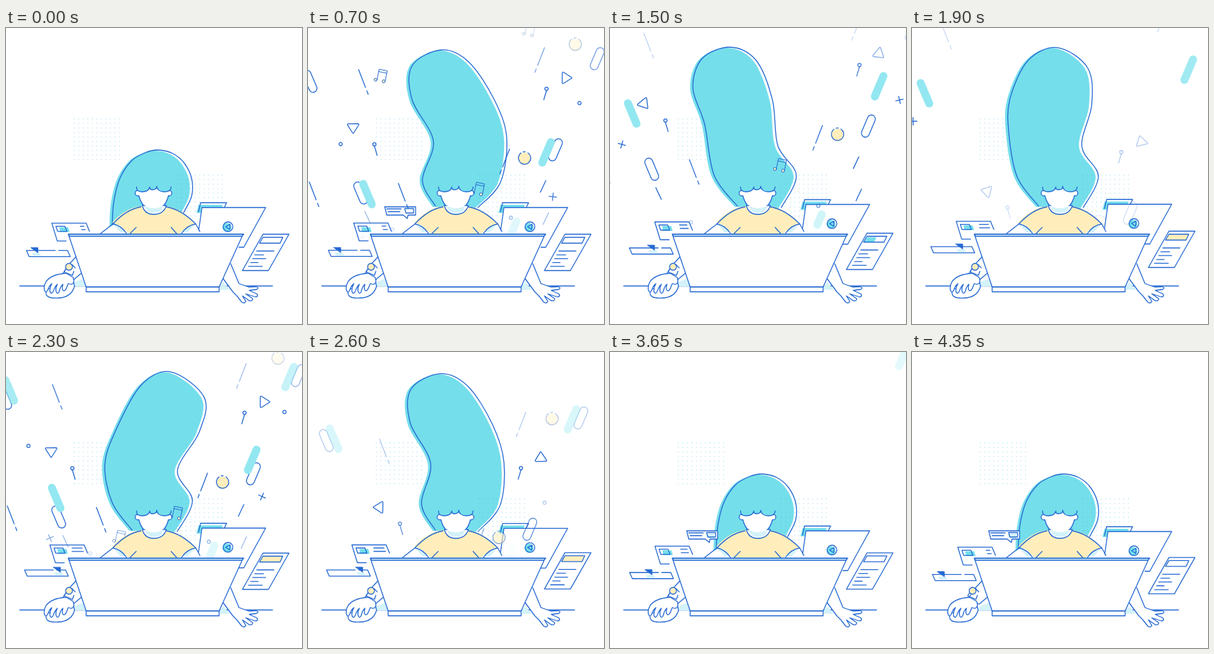
An HTML page with a canvas for the animation above (4400 ms loop, 432 px wide and 432 px high).

```html
<!DOCTYPE html>
<html lang="en">
<head>
<meta charset="utf-8">
<title>Hair-raising desk</title>
<style>
html, body { margin: 0; width: 100%; height: 100%; overflow: hidden; background: #fff; }
canvas { display: block; width: 432px; height: 432px; }
</style>
</head>
<body>
<canvas id="stage"></canvas>
<script>
const LOOP = 4400, BLUE = '#2468d2', CYAN = '#74deeb', PALE = '#d3f2f9', YELLOW = '#ffeebb';
const canvas = document.getElementById('stage'), c = canvas.getContext('2d');
const ratio = window.devicePixelRatio || 1;
canvas.width = canvas.height = 432 * ratio;

const clamp = v => Math.max(0, Math.min(1, v));
const frac = v => v - Math.floor(v);
const ease = v => (1 - Math.cos(Math.PI * clamp(v))) / 2;

// Eased value through [time, value] pairs.
function key(t, ...pairs) {
  let i = 0;
  while (i < pairs.length - 1 && t > pairs[i + 1][0]) i++;
  const [t0, a] = pairs[i], [t1, b] = pairs[i + 1] || [t0 + 1, a];
  return a + (b - a) * ease((t - t0) / (t1 - t0));
}

function draw(d, fill, line = BLUE, width = 1.3) {
  const p = d instanceof Path2D ? d : new Path2D(d);
  if (fill) { c.fillStyle = fill; c.fill(p); }
  if (line) { c.strokeStyle = line; c.lineWidth = width; c.stroke(p); }
}

function disc(x, y, r, fill, line = BLUE, width) {
  const p = new Path2D();
  p.arc(x, y, r, 0, 7);
  draw(p, fill, line, width);
}

function at(x, y, paint) {
  c.save();
  c.translate(x, y);
  paint();
  c.restore();
}

function dots(x, y) {
  c.fillStyle = 'rgba(70,190,220,.35)';
  for (let i = 0; i < 11; i++)
    for (let j = 0; j < 10; j++) c.fillRect(x + i * 6.6, y + j * 6.6, 1.4, 1.4);
}

// Hair: outline points from the left temple over the top to the right one.
const REST = [[155,292],[157,256],[166,220],[183,194],[203,182],[222,178],[243,183],[260,197],[271,220],[271,245],[259,270]];
const BENT_LEFT = [[186,260],[167,222],[183,165],[152,105],[152,55],[195,32],[235,50],[272,105],[290,160],[281,225],[248,262]];
const BENT_RIGHT = [[184,260],[155,220],[144,165],[160,115],[197,49],[241,29],[290,67],[282,117],[250,173],[272,217],[250,262]];
const LEANING = [[186,260],[152,215],[138,140],[121,88],[134,45],[175,28],[213,47],[237,105],[245,172],[272,215],[250,262]];
const SWAY = [BENT_LEFT, BENT_RIGHT, LEANING];

function hairPoints(t) {
  const up = key(t, [100, 0], [560, 1], [3300, 1], [3600, 0]);
  const s = frac((t - 700) / 483) * 3, n = Math.floor(s), mix = ease(s - n);
  const from = SWAY[n], to = SWAY[(n + 1) % 3];
  return REST.map((p, i) => p.map((v, k) => {
    const wave = from[i][k] + (to[i][k] - from[i][k]) * mix;
    return v + (wave - v) * up;
  }));
}

function smooth(pts) {
  const p = new Path2D(), get = i => pts[Math.max(0, Math.min(pts.length - 1, i))];
  p.moveTo(...pts[0]);
  for (let i = 0; i < pts.length - 1; i++) {
    const [a, b, d, e] = [get(i - 1), get(i), get(i + 1), get(i + 2)];
    p.bezierCurveTo(b[0] + (d[0] - a[0]) / 6, b[1] + (d[1] - a[1]) / 6,
      d[0] - (e[0] - b[0]) / 6, d[1] - (e[1] - b[1]) / 6, ...d);
  }
  return p;
}

function hair(t) {
  const p = smooth(hairPoints(t));
  at(-4, 1, () => draw(p, CYAN, null));
  draw(p);
}

// Flying shapes, drawn for the right side and mirrored for the left.
function capsule(length, fill, line) {
  c.rotate(.4);
  const p = new Path2D();
  p.roundRect(-5.8, -length / 2, 11.6, length, 5.8);
  draw(p, fill, line);
}

const shapes = {
  ring: () => disc(0, 0, 2.4),
  outline: () => capsule(34, null, BLUE),
  cyan: () => capsule(44, '#93e7f1', null),
  pale: () => capsule(28, '#93e7f1', null),
  dash: () => draw('M5 -13 L-5 13 M-7 18 L-9 23'),
  tick: () => draw('M4 -9 L-4 8'),
  pin: () => { disc(1, -7, 2.4); draw('M1 -4.5 L-3 9'); },
  plus(off) { c.rotate(.1 + off * .008); draw('M-5.5 0 H5.5 M0 -5.5 V5.5'); },
  tri(off, side) {
    c.rotate((side < 0 ? 1.57 : 0) + off * .018);
    draw('M-6 -7 Q-6 -9 -4 -8 L7 -1 Q9 0 7 1 L-4 8 Q-6 9 -6 7 Z');
  },
  sun() {
    disc(0, 1, 9, YELLOW, null);
    const p = new Path2D();
    p.arc(0, 0, 9, -1, 4.1);
    draw(p);
    draw('M-2 -9 L1 -9.2');
  },
  note(off, side) {
    c.scale(side, 1);
    c.rotate(.2);
    disc(-6, 7, 2.2, YELLOW, BLUE, .9);
    disc(6, 7, 2.2, YELLOW, BLUE, .9);
    draw('M-4 7 V-9 H8 V7 M-4 -5.5 H8', null, BLUE, .9);
  }
};

// Two depths: period, phase at 700 ms and distance of one run.
const STREAMS = { slow: [650, .65, 165], fast: [600, .45, 388] };

// shape, x, y, stream, speed, start, end
const flyers = [
  ['tri', 66, 146, 'slow'], ['tri', 377, 73, 'slow'],
  ['pin', 98, 177, 'slow'], ['pin', 347, 96, 'slow'],
  ['outline', 77, 241, 'slow'], ['outline', 361, 178, 'slow'],
  ['sun', 316, 190, 'slow'], ['sun', 118, 248, 'slow', 1, 2700],
  ['dash', 289, 190, 'slow'], ['dash', 137, 240, 'slow'],
  ['tick', 343, 232, 'slow'], ['tick', 347, 279, 'slow'],
  ['tick', 87, 277, 'slow'], ['dash', 7, 238, 'slow'],
  ['note', 248, 235, 'slow'], ['note', 165, 270, 'slow', 1, 1900],
  ['note', 106, 70, 'slow', 1, 150, 1300], ['note', 322, 3, 'slow', 1, 150, 1300],
  ['pale', 301, 290, 'slow', .3], ['ring', 296, 277, 'slow', .5], ['ring', 123, 294, 'slow', .3],
  ['cyan', 87, 243, 'fast'], ['cyan', 348, 182, 'fast', .82],
  ['ring', 48, 170, 'fast', 1.1], ['ring', 396, 110, 'fast', .75],
  ['plus', 80, 306, 'fast', 1.15], ['plus', 357, 247, 'fast', 1.2],
  ['dash', 79, 74, 'fast', .45], ['dash', 340, 42, 'fast', .4],
  ['sun', 390, 24, 'fast', .5],
  ['outline', 3, 78, 'fast', .35], ['outline', 422, 45, 'fast', .35],
  ['cyan', 11, 68, 'fast', .4, 1900],
  ['cyan', 409, 47, 'fast', .35, 1900, 3800]
];

function fly(t, [shape, x, y, stream, speed = 1, start = 150, end = 3550]) {
  const [period, phase, run] = STREAMS[stream], side = x < 216 ? -1 : 1;
  // The burst cuts back once and plays on.
  const clock = t < 1900 ? t : t - 950;
  const runs = (clock - 700) / period + phase;
  if (runs < 0) return;
  const u = frac(runs), off = (u - phase) * run * speed;
  const px = x + (shape === 'note' ? 0 : side * .42 * off), py = y - .91 * off;
  c.globalAlpha = clamp((t - start) / 150) * clamp((end - t) / 150) * clamp(u / .1) * clamp((1 - u) / .1)
    * Math.max(.25, clamp(py / 70)) * clamp((310 - py) / 70);
  if (c.globalAlpha > 0) at(px, py, () => {
    c.scale(side, 1);
    shapes[shape](off, side);
  });
  c.globalAlpha = 1;
}

function cards(t) {
  const bob = Math.sin(Math.PI * (t - 300) / LOOP) ** 2;
  at(-3 * bob, -3.5 * bob, () => {
    draw('M88 311 H75 L67 285 H117 L122 297', '#fff');
    draw('M78 291 H91 L93 298 H79 Z', CYAN, null);
    draw('M73 289.5 H86 L89 297 H75.5 Z');
    draw(`M${109 - 10 * bob} 289.5 H114 M${111 - 12 * bob} 294.5 H116`);
  });
  at(-3 * bob, -7 * bob, () => {
    draw('M30 325 L34 334 H94 L90 325 H77 M72 325 H30');
    const x = 40 + 38 * bob;
    draw(`M${x - 4} 328.5 H${x + 7} L${x + 10} 332.5 H${x - 2} Z`, PALE, null);
    draw(`M${x - 5} 321 H${x + 5} V328 Z`, BLUE, BLUE, 1);
  });

  const lift = key(t, [700, 0], [1500, -4.5], [2300, -5], [2950, -4.3], [3650, -1], [4350, 0]);
  at(0, lift, () => {
    draw('M281 258 H316 L313 270 H278 Z', CYAN, null);
    draw('M281 268 L284 255 H322 L318 263');
    draw('M281 297 L286 262 H379 L347 320 H330 V301 Z', '#fff', null);
    draw('M281 297 L286 262 H379 L347 320 H340');
    disc(322.5, 291, 6.5, CYAN, null);
    disc(324, 290, 7);
    draw('M327 286.5 L320.5 290 L326.5 294 Z');
  });

  at(0, key(t, [900, 0], [1500, -1.5], [2300, -7.5], [2950, -9], [3650, -7.8], [4400, -1], [4900, 0]), () => {
    draw('M375 301 H413 L383 354 H345 Z', '#fff');
    if (t > 1200 && t < 1900) draw('M375 307 H389 L385 314 H371 Z', CYAN, null);
    const bar = t >= 1900 && t < 2700 ? YELLOW : null;
    draw('M375 305.5 H404 L400 314 H370 Z', bar);
    [25, 13, 19, 11, 20].forEach((w, i) => draw(`M${366 - 3 * i} ${325.5 + 5.6 * i} h${w}`));
  });

  if (t > 500 && t < 1100 || t > 2700 && t < 4380) {
    draw('M112 261 H157 V273 H146 L145 278 L139 273 H115 Z', '#fff');
    if (t > 3300) draw('M140 265 H152 V272 H141 Z', PALE, null);
    draw('M115 264 H136 M117 268 H134 M141 263.5 H154 V270 H143 Z', null);
  }
}

function girl() {
  draw('M158 286 L138 301 H184 L172 288 Z', '#fff', null);
  draw('M258 288 L276 286 L284 301 H250 Z', '#fff', null);
  draw('M155 284 C167 271 180 262 197 260 H234 C252 263 265 273 277 286 Q266 289 258 296 L252 301 H182 L174 296 Q168 287 155 284 Z', YELLOW, null);
  draw('M157 287 Q168 289 174 298 L168 299 Z M275 288 Q264 289 258 298 L264 299 Z', PALE, null);
  draw('M197 261 C180 264 167 274 156 286 L138 300 M156 286 Q168 288 176 300 M234 261 C252 264 265 274 277 286 L283 297 M277 286 Q264 288 256 300');
  draw('M190 291 L181 300 M241 291 L249 300');
  draw('M199 259 Q202 272 216 272 Q230 272 234 259 Z', '#fff');
  draw('M203 261 Q206 270 216 270 Q227 270 229 261 Z', PALE, null);
  disc(192.5, 241, 4, '#fff');
  disc(238, 241, 4, '#fff');
  draw('M194 235 V245 C196 257 206 263 216 263 C226 263 235 257 237 245 V235 Z', '#fff', null);
  draw('M194 245 Q196 253 200 258 M237 245 Q235 253 231 258');
  const fringe = 'M190.5 232 Q190 239 199 239 Q208 239 210 232 Q209 236 214 236 Q220 236 220 231 Q221 239 231 239 Q241 239 241 232';
  draw(fringe + ' L232 222 H200 Z', CYAN, null);
  draw(fringe);
}

function leftHand(t) {
  const shift = key(t, [3700, 0], [4150, -4.5], [4330, -4.5], [4400, 0]);
  draw('M100 371 L112 366 L116 377 H93 Z', PALE, null);
  draw('M103 333 L91 346 L82 360 L98 368 L111 357', '#fff');
  at(shift, 0, () => {
    draw('M59 382 C56 392 63 395 76 394 C88 394 97 388 100 377 L98 368 Z', '#fff');
    draw('M88 358 C73 359 62 364 58 371 C54 379 56 386 59 385 C62 384 61 377 67 373 C63 380 63 387 67 387 C70 386 69 379 75 374 C71 381 73 388 76 387 C79 386 77 379 83 374 C81 381 83 385 86 383 C89 380 90 374 91 373 C97 376 101 372 98 364 Z', '#fff');
    disc(92, 348.5, 5, YELLOW);
    draw('M87 352 L85 356 L97 361 L99 355 M96 345 L101 350', null);
  });
}

function rightHand() {
  draw('M312 377 L317 371 L327 382 H312 Z', PALE, null);
  draw('M328 344 L340 373 L354 378 L365 377.5 Q370 379 366 381.5 L355 383 L366 388 Q369 392 364 392.5 L350 388 L360 395 Q360 399 355 398 L345 391 L350 399 Q348 403 344 400 L337 391 L331 385 L317 366', '#fff');
}

function laptop() {
  draw('M91 301 H346 L311 378 H117 Z', '#fff');
  draw('M91 301 L93 304 H344 L347 301 Z', PALE);
  draw('M117 378 H311 V385 H117 Z', '#fff');
}

function frame(now) {
  const t = now % LOOP;
  c.setTransform(ratio, 0, 0, ratio, 0, 0);
  c.fillStyle = '#fff';
  c.fillRect(0, 0, 432, 432);
  c.lineCap = c.lineJoin = 'round';
  dots(99, 132);
  hair(t);
  dots(249, 214);
  cards(t);
  flyers.forEach(f => fly(t, f));
  girl();
  draw('M20 376.5 H117 M311 376.5 H389');
  leftHand(t);
  rightHand();
  laptop();
  requestAnimationFrame(() => frame(performance.now() - begin));
}

const begin = performance.now();
frame(0);
</script>
</body>
</html>
```
